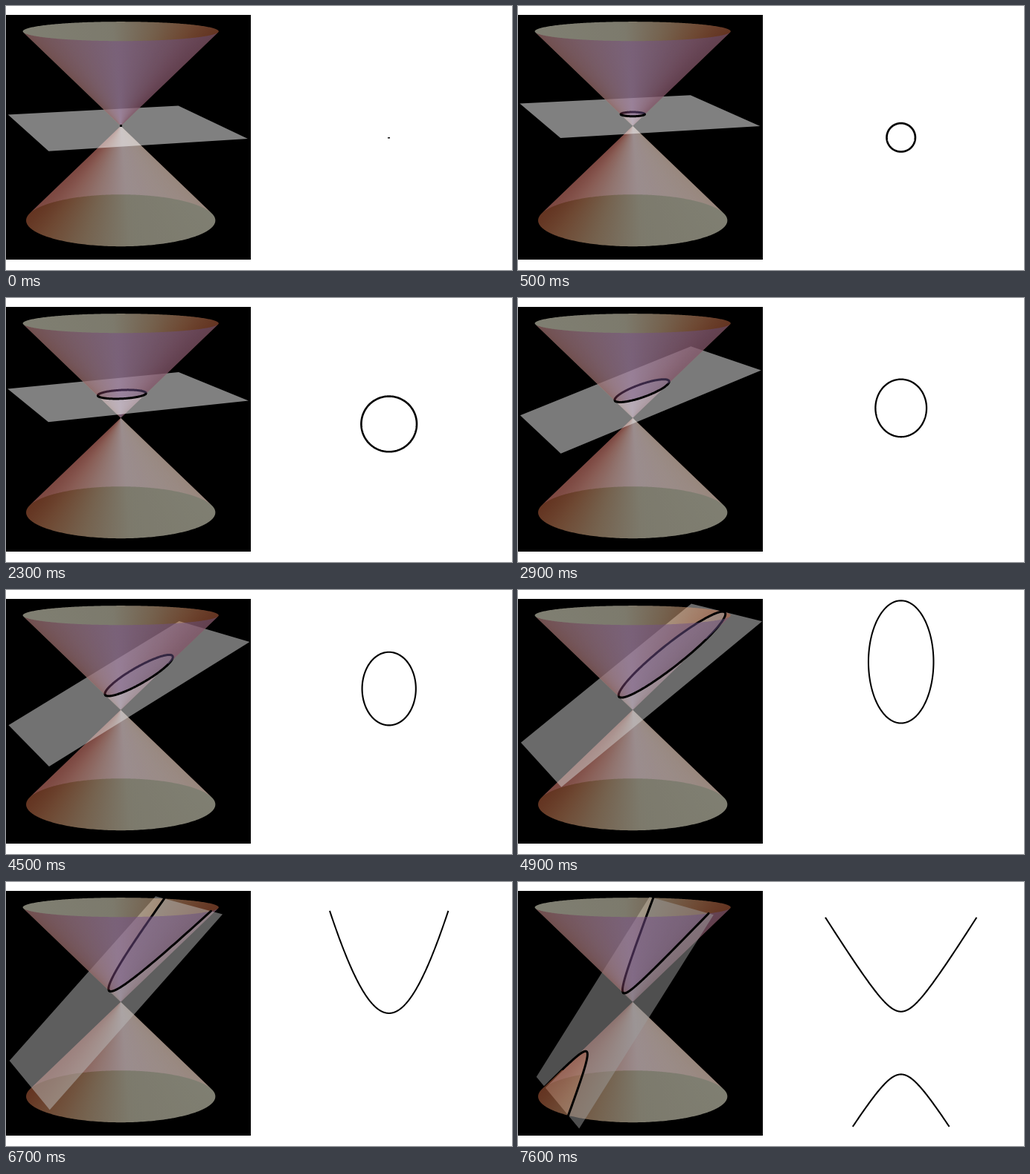
Animation of 680 by 356 pixels, one loop 8000 ms. Source, as an HTML page with a canvas:

```html
<!DOCTYPE html>
<html lang="en">
<head>
<meta charset="utf-8">
<title>Conic sections</title>
<style>
  html, body { margin: 0; width: 680px; height: 356px; overflow: hidden; background: #fff; }
  canvas { display: block; }
</style>
</head>
<body>
<canvas id="stage" width="680" height="356"></canvas>
<script>
const ctx = document.getElementById('stage').getContext('2d');
const { PI, sin, cos, acos, atan2, sqrt, min, max, floor, round, hypot } = Math;

// Camera: distance, elevation, focal length, azimuth of the x axis
const DIST = 11, SIN_E = 0.188, COS_E = sqrt(1 - SIN_E ** 2), FOCAL = 1417, AZ = 16.8 * PI / 180;
const APEX = [154.2, 161.7], CENTER = [514.7, 177.3];
const BASE_SCALE = 153.5;

// Surface colours by the sideways part of the normal, for faces tilted up and down
const UP = [[-1, 200, 106, 68], [-.75, 220, 145, 102], [-.4, 232, 192, 152], [.1, 248, 243, 216], [1, 253, 252, 226]];
const DOWN = [[-1, 98, 30, 38], [-.5, 112, 58, 92], [0, 120, 76, 138], [.5, 108, 80, 136], [1, 96, 76, 122]];

// u: right, w: towards the viewer, z: up
function project(u, w, z) {
  const k = FOCAL / (DIST - w * COS_E - z * SIN_E);
  return [APEX[0] + u * k, APEX[1] - (z * COS_E - w * SIN_E) * k];
}
const toView = (x, y) => [x * cos(AZ) + y * sin(AZ), y * cos(AZ) - x * sin(AZ)];
const projectWorld = (x, y, z) => project(...toView(x, y), z);

function ramp(stops, p) {
  let i = 1;
  while (i < stops.length - 1 && p > stops[i][0]) i++;
  const a = stops[i - 1], b = stops[i];
  const f = (p - a[0]) / (b[0] - a[0]);
  const c = [1, 2, 3].map(j => round(a[j] + (b[j] - a[j]) * f));
  return `rgba(${c},0.5)`;
}

function fillPolygon(points, paint) {
  ctx.beginPath();
  points.forEach(p => ctx.lineTo(...p));
  ctx.closePath();
  ctx.fillStyle = paint;
  ctx.fill();
}

// One half of a nappe (side: 1 upper, -1 lower), shaded around the apex
function makeSheet(side, front) {
  const half = acos(side * SIN_E / COS_E);
  const from = front ? -half : half;
  const to = front ? half : 2 * PI - half;
  const start = side * PI / 2;
  const paint = ctx.createConicGradient(start, ...APEX);
  const stops = side > 0 === front ? DOWN : UP;
  for (let i = 0; i <= 40; i++) {
    const a = from + (to - from) * i / 40;
    const [px, py] = project(sin(a), cos(a), side);
    const turn = (atan2(py - APEX[1], px - APEX[0]) - start) / (2 * PI);
    paint.addColorStop(turn - floor(turn), ramp(stops, front ? sin(a) : -sin(a)));
  }
  return { side, from, to, paint };
}
const backSheets = [makeSheet(1, false), makeSheet(-1, false)];
const frontSheets = [makeSheet(1, true), makeSheet(-1, true)];

// The part of a sheet above or below the plane z = h + m x
function drawSheet({ side, from, to, paint }, h, m, above) {
  const inner = [], outer = [];
  for (let i = 0; i <= 180; i++) {
    const a = from + (to - from) * i / 180;
    const d = side - m * sin(a - AZ);
    const cut = d > 0 ? min(1, h / d) : 1;
    const at = r => project(r * sin(a), r * cos(a), r * side);
    inner.push(at(above ? cut : 0));
    outer.push(at(above ? 1 : cut));
  }
  fillPolygon(outer.concat(inner.reverse()), paint);
}

function drawPlane(h, m) {
  const x0 = m ? max(-1, (-1 - h) / m) : -1;
  const x1 = m ? min(1, (1 - h) / m) : 1;
  const corners = [[x0, -1], [x1, -1], [x1, 1], [x0, 1]];
  const g = round(255 * (.15 + .85 / hypot(1, m)));
  fillPolygon(corners.map(([x, y]) => projectWorld(x, y, h + m * x)), `rgba(${g},${g},${g},0.5)`);
}

// Branches of the section as lists of points on the cone
function section(h, m) {
  const branch = (from, to) => Array.from({ length: 241 }, (_, i) => {
    const t = from + (to - from) * i / 240;
    const r = h / (1 - m * cos(t));
    return [r * cos(t), r * sin(t), r];
  });
  const t1 = m > 1 - h ? acos((1 - h) / m) : 0;
  const branches = [branch(t1, 2 * PI - t1)];
  if (m > 1 + h) {
    const t2 = acos((1 + h) / m);
    branches.push(branch(-t2, t2));
  }
  return branches;
}

const isFront = ([x, y, z]) => toView(x, y)[1] * COS_E - z * SIN_E > 0;

function drawCurve(branches, front) {
  ctx.beginPath();
  for (const pts of branches) {
    for (let i = 1; i < pts.length; i++) {
      if (isFront(pts[i]) !== front) continue;
      ctx.moveTo(...projectWorld(...pts[i - 1]));
      ctx.lineTo(...projectWorld(...pts[i]));
    }
  }
  ctx.lineCap = 'round';
  ctx.lineWidth = 3;
  ctx.stroke();
}

// The section seen face on
function drawFlat(branches, h, m) {
  const s2 = 2 * m / (1 + m * m);
  const scale = BASE_SCALE / (1 + s2 * (.307 + .042 * s2 ** 6));
  const vertexY = CENTER[1] + h * BASE_SCALE * (1 - m) / (1 + 4.3 * m);
  const rise = scale * hypot(1, m);
  ctx.beginPath();
  for (const pts of branches) {
    pts.forEach(([x, y], i) => {
      const p = [CENTER[0] + y * scale, vertexY - (x + h / (1 + m)) * rise];
      i ? ctx.lineTo(...p) : ctx.moveTo(...p);
    });
  }
  ctx.lineCap = 'butt';
  ctx.lineWidth = 2.7 * scale / BASE_SCALE;
  ctx.stroke();
}

function draw(h, m) {
  ctx.fillStyle = '#fff';
  ctx.fillRect(0, 0, 680, 356);
  ctx.fillStyle = '#000';
  ctx.fillRect(0, 12, 329, 330);
  ctx.strokeStyle = '#000';

  const curve = h ? section(h, m) : [];
  for (const s of [...backSheets, ...frontSheets]) drawSheet(s, h, m, false);
  drawPlane(h, m);
  for (const s of backSheets) drawSheet(s, h, m, true);
  drawCurve(curve, false);
  for (const s of frontSheets) drawSheet(s, h, m, true);
  drawCurve(curve, true);

  if (h) {
    drawFlat(curve, h, m);
  } else {
    ctx.fillStyle = '#000';
    ctx.fillRect(153, 160, 3, 3);
    ctx.fillRect(513, 177, 3, 1.5);
  }
}

// One rise and three tilts of ten steps, 100 ms each, with rests between
const begin = performance.now();
let shown = -1;
function tick() {
  const n = floor((performance.now() - begin) % 8000 / 100);
  if (n !== shown) {
    shown = n;
    const steps = first => min(10, max(0, n - first));
    draw(.025 * steps(0), .05 * (steps(22) + steps(44) + steps(66)));
  }
  requestAnimationFrame(tick);
}
tick();
</script>
</body>
</html>
```
